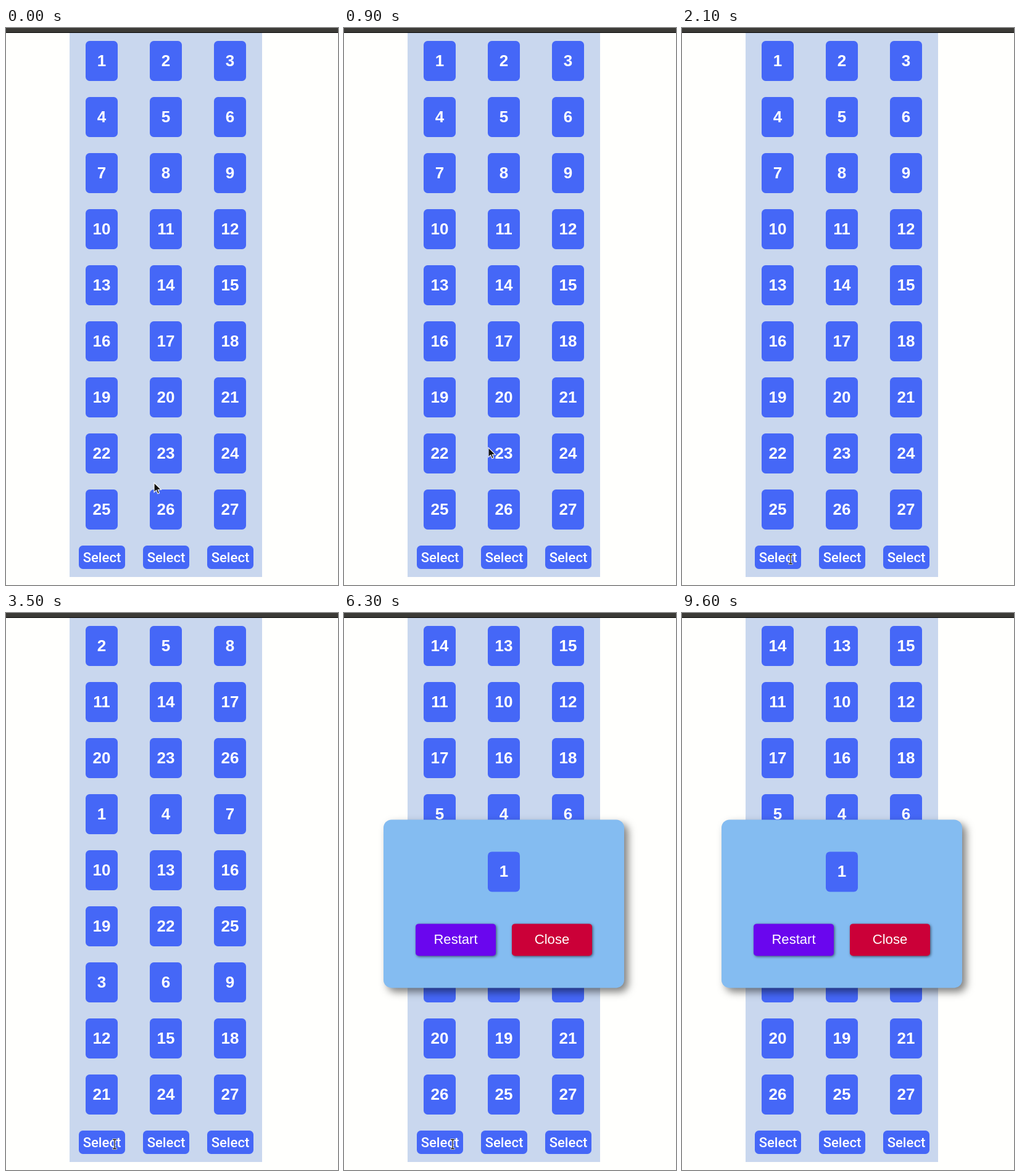
Recreate the animation shown at these times as an HTML page. Size 538 by 904 pixels, loop 9.9 s.

```html
<!DOCTYPE html>
<html lang="en">
<head>
<meta charset="utf-8">
<title>Card trick</title>
<style>
  html, body { margin: 0; width: 100%; height: 100%; overflow: hidden; background: #fffffd; }
  body { position: relative; color: #fff; }
  body > * { position: absolute; }
  #bar { left: 0; top: 0; width: 100%; height: 7px; background: #3c3b37; border-bottom: 1px solid #000; }
  #panel {
    left: 103px; top: 8px; width: 312px; height: 883px; box-sizing: border-box; padding-top: 13px;
    display: grid; grid-template-columns: repeat(3, 104px); grid-auto-rows: 65px; row-gap: 26px;
    justify-items: center; align-items: start; background: #c9d7ee;
  }
  .card, .select, .action { display: flex; align-items: center; justify-content: center; border-radius: 6.5px; }
  .card { width: 52px; height: 65px; background: #4567f7; font: bold 26px "Liberation Sans", Arial, sans-serif; }
  .select { width: 75px; height: 38px; margin-left: 1px; background: #4567f7; font: 500 22.1px Roboto, sans-serif; }
  #modal {
    left: 64px; top: 335px; width: 390px; height: 273px; transform: translateY(.4px);
    border-radius: 13px; background: #84bcf1; box-shadow: 6.5px 6.5px 13px rgba(0, 0, 0, .5);
  }
  #modal > * { position: absolute; }
  #modal .card { left: 169px; top: 52px; }
  .action {
    top: 169px; width: 130px; height: 52px; border-radius: 5px;
    font: 22.1px "Liberation Sans", Arial, sans-serif; box-shadow: 1.3px 1.3px 4px rgba(0, 0, 0, .55);
  }
  #restart { left: 52px; background: #6a06ee; }
  #close { left: 208px; background: #cb0038; }
  #cursor { left: 0; top: 0; width: 538px; height: 904px; overflow: hidden; }
</style>
</head>
<body>
<div id="bar"></div>
<div id="panel"></div>
<div id="modal">
  <div class="card">1</div>
  <div class="action" id="restart">Restart</div>
  <div class="action" id="close">Close</div>
</div>
<svg id="cursor">
  <path id="arrow" d="M0 0V15.5L3.6 12.2 6 17.8 8.6 16.7 6.2 11.2H11.2Z" fill="#111" stroke="#fff" stroke-width="1.1"/>
  <g id="beam" fill="none">
    <path d="M-3.5-7.5H3.5M0-7.5V7.5M-3.5 7.5H3.5" stroke="#fff" stroke-width="3"/>
    <path d="M-3-7.5H3M0-7.5V7.5M-3 7.5H3" stroke="#111" stroke-width="1.3"/>
  </g>
</svg>
<script>
const LOOP = 9900;
const DEALS = [3500, 4800, 6300];
// Pointer stops: time, x, y, shape
const STOPS = [
  [0, 240, 738, "arrow"], [200, 240, 629, "arrow"],
  [500, 244, 598, "arrow"], [600, 246, 575, "arrow"], [700, 244, 602, "arrow"],
  [800, 240, 641, "arrow"], [900, 234, 681, "arrow"], [1000, 228, 724, "arrow"],
  [1100, 220, 767, "arrow"], [1200, 210, 806, "arrow"], [1300, 200, 834, "arrow"],
  [1400, 191, 849, "arrow"], [1500, 187, 858, "arrow"],
  [1600, 183, 867, "beam"], [1700, 182, 865, "beam"], [2100, 176, 862, "beam"],
  [9100, 182, 871, "beam"], [9200, 160, 745, "arrow"], [9300, 128, 500, "arrow"],
  [9400, 98, 230, "arrow"], [9500, 77, 40, "arrow"], [9600, 0, 0, "none"]
];
const $ = id => document.getElementById(id);

function add(className, text) {
  const el = document.createElement("div");
  el.className = className;
  el.textContent = text;
  $("panel").append(el);
  return el;
}

// Stack the middle column first, then the left, then the right.
const gather = deck => [1, 0, 2].flatMap(col => deck.filter((_, i) => i % 3 === col));

const decks = [Array.from({ length: 27 }, (_, i) => i + 1)];
DEALS.forEach((_, i) => decks.push(gather(decks[i])));

const cards = decks[0].map(n => add("card", n));
for (let i = 0; i < 3; i++) add("select", "Select");

let shownDeal = 0;
function draw() {
  const t = performance.now() % LOOP;
  const deal = DEALS.filter(at => t >= at).length;
  if (deal !== shownDeal) {
    cards.forEach((card, i) => card.textContent = decks[deal][i]);
    shownDeal = deal;
  }
  $("modal").style.display = deal === DEALS.length ? "" : "none";

  const [, x, y, shape] = STOPS.filter(stop => t >= stop[0]).pop();
  for (const id of ["arrow", "beam"]) {
    $(id).style.display = id === shape ? "" : "none";
    $(id).setAttribute("transform", `translate(${x} ${y})`);
  }
  requestAnimationFrame(draw);
}
draw();
</script>
</body>
</html>
```
